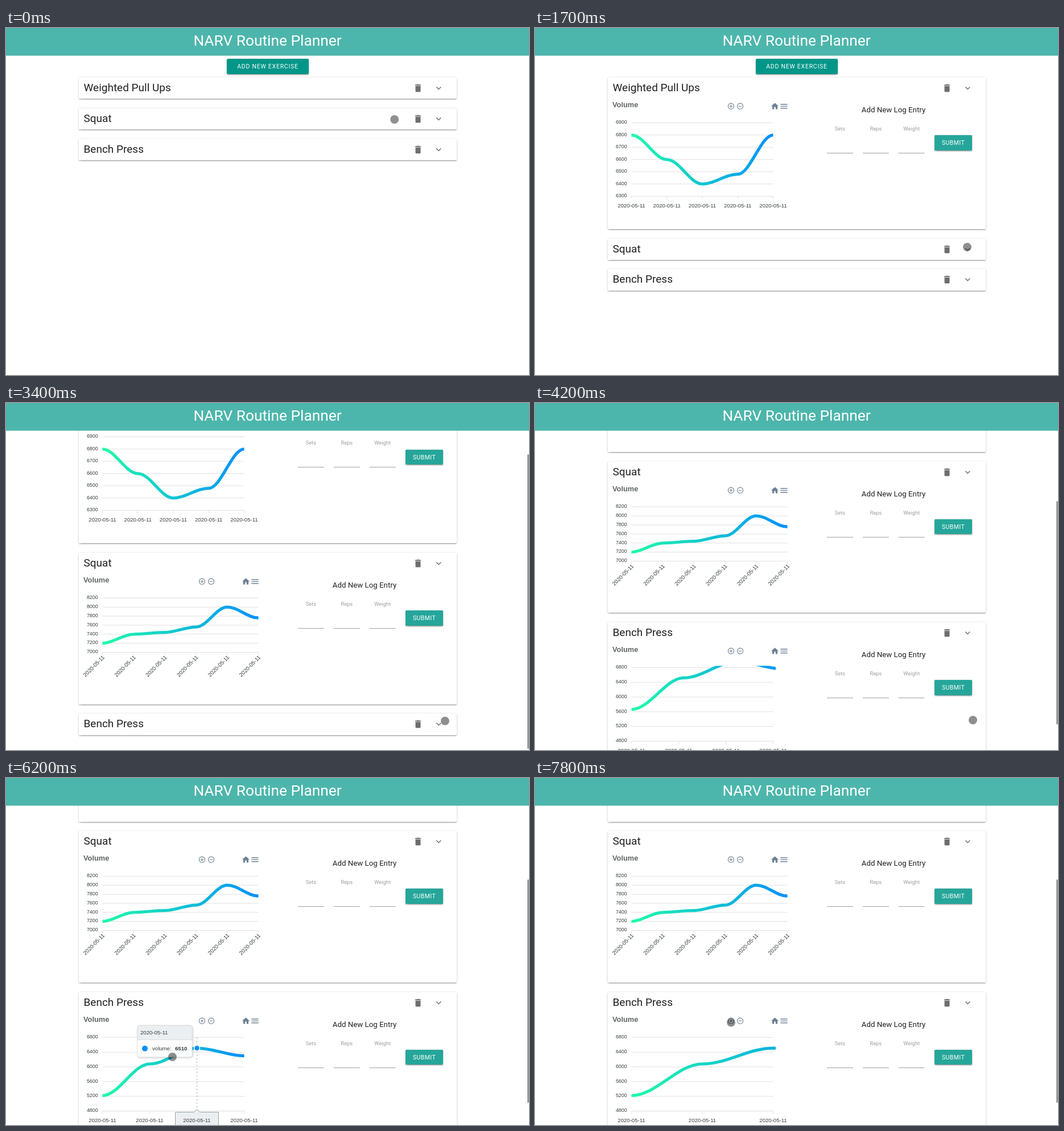
Recreate the animation shown at these times as an HTML page. Size 919 by 609 pixels, loop 8000 ms.

```html
<!DOCTYPE html>
<html lang="en">
<head>
<meta charset="utf-8">
<title>Exercise log</title>
<style>
  html, body { margin: 0; width: 100%; height: 100%; overflow: hidden; background: #fff; }
  body { position: relative; font-family: Roboto, sans-serif; }
  header, .button, .card, .card svg, #thumb, #cursor { position: absolute; }
  header { left: 0; top: 0; width: 919px; height: 48px; background: #4db6ac; color: #fff;
    box-shadow: 0 1px rgba(77,182,172,.6); font-size: 26.3px; line-height: 44px; text-align: center; }
  .button, .card { box-shadow: 0 1.5px 1.5px rgba(0,0,0,.14), 0 2.25px .75px -1.5px rgba(0,0,0,.16), 0 .75px 3.75px rgba(0,0,0,.2); }
  .button { border-radius: 1.5px; color: #fff; text-align: center; white-space: nowrap; }
  #add { left: 388px; width: 144px; height: 26.5px; line-height: 27px; background: #009688;
    border-radius: 2.25px; font-size: 10.5px; letter-spacing: .75px; }
  .submit { left: 574px; top: 101.3px; width: 66px; height: 26.5px; line-height: 27.5px; background: #26a69a;
    font-size: 10.5px; letter-spacing: .4px; }
  .card { left: 128px; width: 664px; background: #fff; border-radius: 1.5px; }
  .card svg { left: -128px; top: 0; overflow: visible; }
  .chart { font: 9.6px "Liberation Sans", Arial, sans-serif; fill: #373d3f; }
  .small { font-size: 8.9px; }
  .mid { text-anchor: middle; }
  .end { text-anchor: end; }
  .tools { fill: #6e8192; }
  .grid { stroke: #e0e0e0; }
  #thumb { left: 915.5px; width: 3px; border-radius: 2px; background: #999; }
  #cursor { left: -7.1px; top: -7.5px; width: 15px; height: 15px; border-radius: 50%; background: rgba(0,0,0,.44); }
</style>
</head>
<body>
<svg width="0" height="0" style="position:absolute">
  <linearGradient id="blend"><stop stop-color="#21fba8"/><stop offset="1" stop-color="#008ffb"/></linearGradient>
</svg>
<div id="page"><div id="add" class="button">ADD NEW EXERCISE</div></div>
<header>NARV Routine Planner</header>
<div id="thumb"></div>
<div id="cursor"></div>
<script>
const LOOP = 8000, VIEW = 609, LEFT = 169.5, TOP = 79.3, DATE = '2020-05-11';
const CLOSED = 37.3, OPEN = 265.9, GAP = 16.6;

const exercises = [
  { name: 'Weighted Pull Ups', openAt: 750, drawAt: 850, min: 6300, max: 6900, step: 100,
    right: 418.5, bottom: 208.3, values: [6800, 6600, 6400, 6480, 6800] },
  { name: 'Squat', openAt: 1900, drawAt: 2000, min: 7000, max: 8200, step: 200, tilted: true,
    right: 443.5, bottom: 174.5, values: [7200, 7400, 7440, 7560, 8000, 7760] },
  { name: 'Bench Press', openAt: 3650, drawAt: 3650, min: 4800, max: 6800, step: 400, zooms: true,
    right: 418.5, bottom: 208.5, values: [5220, 6080, 6510, 6300] },
];
const cursorPath = [
  [0, 682, 160], [550, 761, 112], [850, 761, 112], [1250, 769, 360], [1450, 769, 360],
  [1700, 759, 384], [1900, 759, 384], [2500, 773, 440], [2600, 773, 440], [2900, 773, 444],
  [3100, 773, 444], [3400, 771, 557.5], [4200, 769, 556], [4600, 769, 556], [5200, 405, 500],
  [5350, 394, 487], [5500, 350, 487], [6200, 292, 489], [6400, 286, 498], [6600, 255, 505],
  [6780, 255, 505], [6850, 360, 439], [7000, 352, 431], [7200, 344, 428.5], [LOOP, 344, 428.5],
];

const $ = id => document.getElementById(id);
const show = (el, on) => { el.style.display = on ? '' : 'none'; };
const ease = (t, from, to) => {
  const k = Math.min(1, Math.max(0, (t - from) / (to - from)));
  return (1 - Math.cos(Math.PI * k)) / 2;
};
const yOf = (ex, v) => ex.bottom - (v - ex.min) / (ex.max - ex.min) * (ex.bottom - TOP);
const xOf = (ex, i, count = ex.values.length) => LEFT + (ex.right - LEFT) * i / (count - 1);
const line = (x1, y1, x2, y2) => `<path d="M${x1} ${y1}L${x2} ${y2}"/>`;
const icon = (x, y, scale, d) => `<path transform="translate(${x} ${y}) scale(${scale})" d="${d}"/>`;
const text = (x, y, str, attrs = '') => `<text x="${x}" y="${y}" ${attrs}>${str}</text>`;

function grid(ex) {
  let out = '';
  for (let v = ex.min; v <= ex.max; v += ex.step) {
    const y = yOf(ex, v);
    out += `<g class="grid">${line(LEFT, y, ex.right, y)}</g>` + text(161.7, y + 1.8, v, 'class="end small"');
  }
  return out;
}

function dates(ex, count) {
  let out = '';
  for (let i = 0; i < count; i++) {
    const x = xOf(ex, i, count);
    out += `<g class="grid">${line(x, ex.bottom, x, ex.bottom + 5)}</g>` + (ex.tilted
      ? text(0, 0, DATE, `class="end" transform="translate(${x + 4.3} 184) rotate(-45)"`)
      : text(x, 228.4, DATE, 'class="mid"'));
  }
  return out;
}

// Horizontal tangents at every value; lift raises the line, stretch widens it.
function curve(ex, lift, stretch) {
  const pts = ex.values.map((v, i) => [LEFT + (xOf(ex, i) - LEFT) * stretch, yOf(ex, v) - lift]);
  return pts.map(([x, y], i) => {
    if (!i) return `M${x} ${y}`;
    const [px, py] = pts[i - 1], d = (x - px) * .35;
    return `C${px + d} ${py} ${x - d} ${y} ${x} ${y}`;
  }).join('');
}

function tooltip(ex, i, left, top) {
  const x = xOf(ex, i), y = yOf(ex, ex.values[i]);
  return `<g class="hover">
    <path d="M${x} ${TOP}V${ex.bottom}" stroke="#b6b6b6" stroke-dasharray="3"/>
    <circle cx="${x}" cy="${y}" r="5" fill="#008ffb" stroke="#fff" stroke-width="1.6"/>
    <path d="M${x - 38} 210.5h33l5-5 5 5h33v25h-76z" fill="#eceff1" stroke="#90a4ae"/>
    ${text(x, 228.4, DATE, 'class="mid"')}
    <g transform="translate(${left} ${top})">
      <rect width="96" height="55.5" rx="4" fill="#fff" fill-opacity=".96" stroke="#e3e3e3"
        style="filter:drop-shadow(1px 1px 1.5px rgba(0,0,0,.2))"/>
      <path d="M0 25V4a4 4 0 0 1 4-4h88a4 4 0 0 1 4 4v21z" fill="#eceff1" stroke="#ddd"/>
      ${text(5, 16, DATE)}
      <circle cx="13" cy="40.5" r="5" fill="#008ffb"/>
      ${text(26, 44, 'volume:')}${text(66, 44, ex.values[i], 'font-weight="bold"')}
    </g></g>`;
}

function cardMarkup(ex, n) {
  const ring = 'M12 2a10 10 0 1 0 0 20 10 10 0 0 0 0-20zm0 18a8 8 0 1 1 0-16 8 8 0 0 1 0 16z';
  const fields = ['Sets', 'Reps', 'Weight'].map((label, i) => {
    const x = 536 + i * 62.8;
    return text(x, 93, label, 'class="mid" font-size="9.3" fill="#9e9e9e"') +
      `<g stroke="#9e9e9e">${line(x - 23, 132.6, x + 23, 132.6)}</g>`;
  }).join('');
  return `<svg width="919" height="266">
    ${text(136.5, 24.2, ex.name, 'font-size="19" fill="#212121"')}
    <g fill="#6e6e6e">
      ${icon(715, 9.5, .75, 'M6 19c0 1.1.9 2 2 2h8c1.1 0 2-.9 2-2V7H6v12zM19 4h-3.5l-1-1h-5l-1 1H5v2h14V4z')}
      ${icon(751.3, 9.5, .75, 'M16.59 8.59L12 13.17 7.41 8.59 6 10l6 6 6-6z')}
    </g>
    <g class="body">
      <g class="chart">
        ${text(136, 52.4, 'Volume', 'font-weight="bold" font-size="12.8" fill="#5f6365"')}
        <g class="tools">
          ${icon(337.7, 43.5, .56, ring + 'M11 7h2v4h4v2h-4v4h-2v-4H7v-2h4z')}
          ${icon(353.8, 43.5, .56, ring + 'M7 11h10v2H7z')}
          ${icon(413.7, 42.5, .65, 'M10 20v-6h4v6h5v-8h3L12 3 2 12h3v8z')}
          ${icon(429.3, 42.2, .68, 'M3 18h18v-2H3zM3 13h18v-2H3zM3 6v2h18V6z')}
        </g>
        ${grid(ex)}
        <g class="dates">${dates(ex, ex.values.length)}</g>
        ${ex.zooms ? `<g class="dates">${dates(ex, ex.values.length - 1)}</g>` : ''}
        <clipPath id="clip${n}"><rect x="164" y="${TOP - 3}" width="${ex.right - 159.5}" height="${ex.bottom - TOP + 6}"/></clipPath>
        <g clip-path="url(#clip${n})"><path class="curve" fill="none" stroke="url(#blend)" stroke-width="5.25"/></g>
        ${ex.zooms ? tooltip(ex, 3, 278.5, 67.5) + tooltip(ex, 2, 231, 58.3) : ''}
      </g>
      ${text(630, 60.8, 'Add New Log Entry', 'class="mid" font-size="13.3" fill="#212121"')}
      ${fields}
    </g></svg>
    <div class="button submit">SUBMIT</div>`;
}

const cards = exercises.map((ex, n) => {
  const el = document.createElement('div');
  el.className = 'card';
  el.innerHTML = cardMarkup(ex, n);
  $('page').append(el);
  return { ex, el, body: el.querySelector('.body'), submit: el.querySelector('.submit'),
    curve: el.querySelector('.curve'), dates: el.querySelectorAll('.dates'), hover: el.querySelectorAll('.hover') };
});

function cursorAt(t) {
  const i = cursorPath.findIndex(p => p[0] > t);
  const [t0, x0, y0] = cursorPath[i - 1], [t1, x1, y1] = cursorPath[i];
  const k = (t - t0) / (t1 - t0);
  return [x0 + (x1 - x0) * k, y0 + (y1 - y0) * k];
}

function draw(t) {
  const scroll = 106.6 * ease(t, 2530, 2900) + 169.7 * ease(t, 3700, 4290);
  const zoom = ease(t, 7350, 7780);
  let top = 87;
  for (const { ex, el, body, submit, curve: path, dates, hover } of cards) {
    const open = t >= ex.openAt, height = open ? OPEN : CLOSED;
    el.style.top = top - scroll + 'px';
    el.style.height = height + 'px';
    show(body, open);
    show(submit, open);
    const rest = 1 - ease(t, ex.drawAt, ex.drawAt + 800);
    path.setAttribute('d', curve(ex, rest * (ex.bottom - TOP), ex.zooms ? 1 + .5 * (rest + zoom) : 1));
    if (ex.zooms) {
      show(dates[0], t < 7400);
      show(dates[1], t >= 7400);
      show(hover[0], t >= 5200 && t < 5650);
      show(hover[1], t >= 5650 && t < 6850);
    }
    top += height + GAP;
  }
  $('add').style.top = 54.3 - scroll + 'px';

  const ratio = VIEW / (top + 12);
  show($('thumb'), ratio < 1);
  $('thumb').style.top = scroll * ratio + 'px';
  $('thumb').style.height = VIEW * ratio + 'px';

  const [x, y] = cursorAt(t);
  $('cursor').style.transform = `translate(${x}px, ${y}px)`;
}

const start = performance.now();
function tick() {
  draw((performance.now() - start) % LOOP);
  requestAnimationFrame(tick);
}
tick();
</script>
</body>
</html>
```
